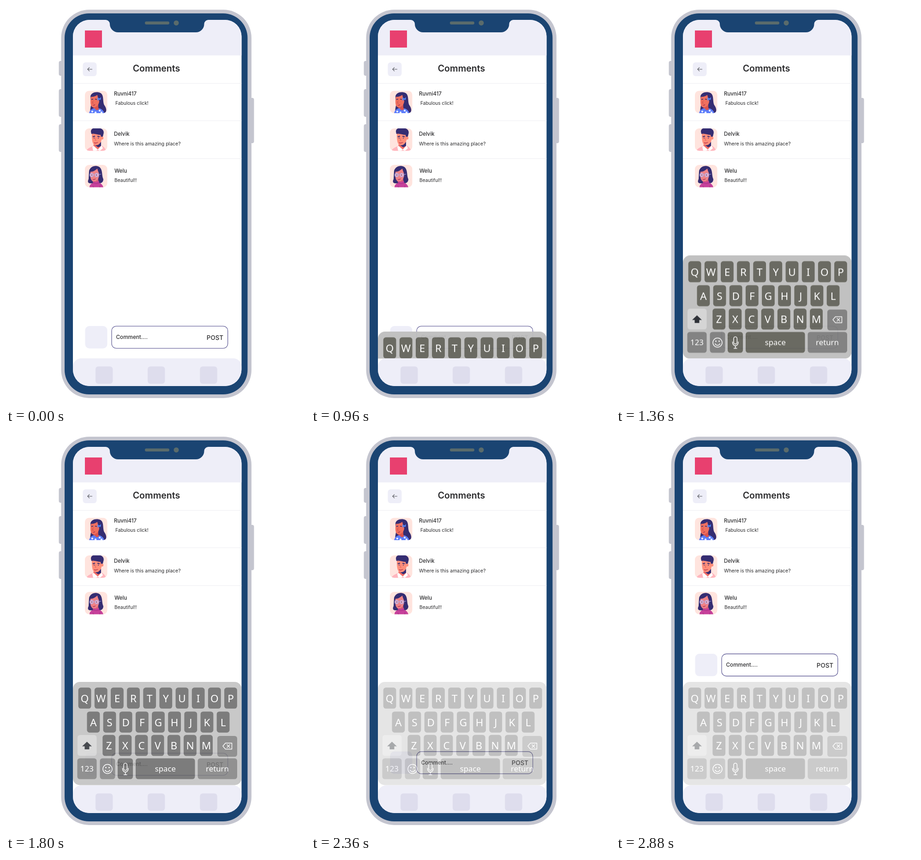
Recreate the animation shown at these times as an HTML page with a canvas. Size 648 by 864 pixels, loop 4.96 s.

```html
<!DOCTYPE html>
<html lang="en">
<head>
<meta charset="utf-8">
<title>Comments</title>
<style>
  html, body { margin: 0; width: 100%; height: 100%; overflow: hidden; background: #fff; }
  canvas { display: block; width: 100vw; height: 100vh; }
</style>
</head>
<body>
<canvas id="stage" width="648" height="864"></canvas>
<script>
const LOOP = 4960, STEP = 40;
const UI = 'Inter, sans-serif', KEYS = '"Noto Sans", "Open Sans", sans-serif';
const PALE = '#eeeef8', INK = '#2b2b2d', NAVY = '#352d72', BLUE = '#1a4472';

const stage = document.getElementById('stage');
const screenCtx = stage.getContext('2d');
const board = document.createElement('canvas');
board.width = 366;
board.height = 224;
const boardCtx = board.getContext('2d');
let c = screenCtx;

function box(x, y, w, h, r, fill, stroke, lw = 1) {
  c.beginPath();
  c.roundRect(x, y, w, h, r);
  if (fill) { c.fillStyle = fill; c.fill(); }
  if (stroke) { c.strokeStyle = stroke; c.lineWidth = lw; c.stroke(); }
}

function disc(x, y, r, fill) {
  c.beginPath();
  c.arc(x, y, r, 0, Math.PI * 2);
  c.fillStyle = fill;
  c.fill();
}

function shape(d, fill) {
  c.fillStyle = fill;
  c.fill(new Path2D(d));
}

function line(d, color, lw = 1) {
  c.strokeStyle = color;
  c.lineWidth = lw;
  c.stroke(new Path2D(d));
}

function text(s, x, y, size, weight = 400, align = 'left', color = INK, family = UI) {
  c.font = `${weight} ${size}px ${family}`;
  c.textAlign = align;
  c.fillStyle = color;
  c.fillText(s, x, y);
}

const clamp = v => Math.min(1, Math.max(0, v));
const progress = (t, start, length) => clamp((t - start) / length);

// cubic-bezier(.42, 0, .58, 1), solved by bisection
function ease(x) {
  if (x <= 0 || x >= 1) return x;
  let lo = 0, hi = 1;
  for (let i = 0; i < 24; i++) {
    const s = (lo + hi) / 2, q = 1 - s;
    if (3 * q * q * s * .42 + 3 * q * s * s * .58 + s * s * s < x) lo = s; else hi = s;
  }
  return lo * lo * (3 - 2 * lo);
}

function drawShell() {
  const grey = '#c4c5cf';
  box(114.5, 119, 10, 32, 4, grey);
  box(114.5, 180, 10, 60, 4, grey);
  box(114.5, 256, 10, 60, 4, grey);
  box(527, 199, 10.5, 98, 4, grey);
  box(119.5, 8, 412.5, 841, 61, grey);
  box(127, 16, 396.5, 825, 53, BLUE);
}

function drawNotch() {
  shape('M216 29 V30 A9 9 0 0 1 225 39 A18 18 0 0 0 243 57 H411.5 A18 18 0 0 0 429.5 39 A9 9 0 0 1 438.5 30 V29Z', BLUE);
  box(301, 33.5, 53, 6.5, 3.25, '#5a6b6b');
  disc(369, 36.7, 5.5, '#5a6b6b');
}

function avatar(y, paint) {
  c.save();
  c.translate(171, y);
  c.beginPath();
  c.roundRect(0, 0, 48.5, 48.5, 9);
  c.clip();
  c.fillStyle = '#ffe4de';
  c.fillRect(0, 0, 49, 49);
  paint();
  c.restore();
}

function longHair() {
  shape('M12 12 C14 3 26 1 34 5 C42 10 38 23 42 31 C47 38 48 44 43 49 H15 C8 43 14 36 13 28Z', NAVY);
  shape('M20 26 H29 V37 C33 39 31 43 25 43 L18 40Z', '#d9544f');
  shape('M13 13 C20 14 25 10 27 9 C28 15 30 18 31 22 C31 30 25 36 18 36 C12 35 12 27 12 22Z', '#f0705f');
  shape('M9 49 C10 42 16 38 21 38 C25 44 29 43 31 38 C38 40 41 44 42 49Z', '#5b7cfb');
  for (const [x, y] of [[16, 45], [23, 47], [32, 43], [36, 47]]) disc(x, y, 2, '#fff');
  shape('M27 14 L31 17 L35 14 L34 20 L30 19 L28 23Z', '#4f86fb');
  line('M14 19 L18 18 M22 18 L26 19', NAVY, 1.3);
  line('M18 21 L16 27 H19', '#c84c4a', 1);
  line('M17 31 Q20 32 22 30', '#a92e4a', 1.2);
}

function shortHair() {
  shape('M20 28 H35 V39 L28 46 L18 40Z', '#f06e68');
  shape('M15 11 C22 7 32 8 37 13 C37 27 34 37 24 37 C16 36 15 27 15 11Z', '#ff8f7b');
  shape('M13 7 C13 1 18 -2 27 0 C37 -2 43 5 40 13 L38 22 L35 21 L34 14 C27 14 20 10 14 12Z', NAVY);
  disc(37, 21, 3.2, '#ff8f7b');
  shape('M20 35 Q28 40 35 29 V38 L29 41 Z', NAVY);
  shape('M3 49 C6 42 14 40 19 38 L28 46 L36 37 C41 40 45 44 46 49Z', '#ffb5bd');
  shape('M19 38 L28 46 L24 49 H18 L16 40Z M36 37 L28 46 L32 49 L39 43Z', '#fff');
  line('M17 18 L22 17 M27 17 L32 18', NAVY, 1.8);
  disc(20, 21, 1, NAVY);
  disc(29, 21, 1, NAVY);
  line('M24 20 L22 26 H25', '#e0645d', 1);
  line('M20 31 Q24 33 28 30', '#b8344c', 1.4);
}

function bobHair() {
  shape('M9 13 C12 2 26 -1 33 6 C39 13 36 23 40 31 C40 37 36 40 31 40 H13 C7 40 5 37 8 31Z', NAVY);
  shape('M19 27 H29 V38 H17Z', '#d95f74');
  shape('M12 15 C20 15 24 10 27 8 C28 14 31 17 31 22 C30 32 24 36 18 36 C12 34 11 25 12 15Z', '#f08386');
  shape('M10 49 C10 43 14 40 18 39 L19 35 C22 38 27 37 30 34 L31 39 C37 41 39 45 40 49Z', '#c6409a');
  line('M18 39 Q24 42 31 39 M17 45 L19 49 M33 44 L32 49', '#a22c83', 1);
  box(10.5, 18, 8, 8, 3.5, 'rgba(220,215,255,.55)', '#a7a4e8');
  box(21.5, 18, 8.5, 8, 3.5, 'rgba(220,215,255,.55)', '#a7a4e8');
  line('M18.5 21 H21.5 M30 21 L35 20', '#a7a4e8');
  disc(15, 22, 1, NAVY);
  disc(25, 22, 1, NAVY);
  line('M17 31 Q20 33 23 30', '#a92e5a', 1.3);
}

function drawPage() {
  c.fillStyle = '#fff';
  c.fillRect(145, 30, 366, 793);
  c.fillStyle = PALE;
  c.fillRect(145, 30, 366, 77);
  box(171, 53, 37, 37, 0, '#e8406f');

  box(166.5, 122, 30, 30, 6, PALE);
  line('M187 137 H177 M181 132.8 L176.8 137 L181 141.2', '#55565c', 1.1);
  text('Comments', 326, 142, 19.6, 600, 'center');
  for (const y of [167, 248, 330]) {
    c.fillStyle = '#eeeef2';
    c.fillRect(145, y, 366, 1);
  }

  avatar(183.5, longHair);
  avatar(265, shortHair);
  avatar(344, bobHair);
  text('Ruvni417', 234, 193.6, 11.4, 500);
  text('Fabulous click!', 237, 214, 10.2);
  text('Delvik', 234, 281.2, 11.4, 500);
  text('Where is this amazing place?', 234, 301.5, 10.5);
  text('Welu', 235, 360.5, 11.4, 500);
  text('Beautiful!!', 235, 381, 10.2);
}

function drawInput(y, touched) {
  box(171.5, y, 48, 48.5, 9, PALE);
  box(229, y + .3, 251.7, 48, 10, '#fff', '#4b4688', 1.1);
  if (touched) {
    disc(267.7, y + 24, 12, 'rgba(255,255,0,.18)');
    disc(267.7, y + 24, 10.3, '#ff0');
  }
  text('Comment....', 238.5, y + 28, 11.7, 500);
  text('POST', 471, y + 29.7, 13.4, 500, 'right');
}

// Key positions are local to the panel's top left corner (145, 539).
function drawBoard(dark) {
  const mid = '#7d7d7d', white = '#fff';
  c = boardCtx;
  c.clearRect(0, 0, 366, 224);
  c.lineCap = c.lineJoin = 'round';
  box(0, 0, 365.5, 223.5, 15, '#bebebe');

  const rows = [['QWERTYUIOP', 25.6, 12.3], ['ASDFGHJKL', 44.4, 64.2], ['ZXCVBNM', 78.2, 114.8]];
  for (const [letters, x0, y] of rows) {
    [...letters].forEach((ch, i) => {
      const x = x0 + i * 35.15;
      box(x - 13.9, y, 27.8, 45.5, 5.5, dark);
      text(ch, x, y + 31.5, 22.5, 400, 'center', white, KEYS);
    });
  }

  box(10, 115, 41.5, 45, 5.5, '#d3d3d3');
  shape('M30.5 129.5 L41 139.5 H35.5 V146 H25.5 V139.5 H20Z', '#24282e');
  box(313, 117, 43, 45, 5.5, mid);
  line('M330.5 132.5 H344.5 V145.5 H330.5 L325 139Z M334 136 L340 142 M340 136 L334 142', white, 1.4);

  box(9.5, 165.5, 42, 45, 5.5, mid);
  text('123', 30.5, 193.7, 16.8, 400, 'center', white, KEYS);
  box(58.5, 165.5, 33, 45, 5.5, mid);
  line('M85 188.5 a10 10 0 1 1 -20 0 a10 10 0 1 1 20 0 M69.5 191 Q75 198 80.5 191', white, 1.5);
  disc(71.5, 185.5, 1.4, white);
  disc(78.5, 185.5, 1.4, white);
  box(97, 165.5, 33, 45, 5.5, dark);
  box(110, 176, 7.4, 15.5, 3.7, null, white, 1.5);
  line('M107.5 187 C107.5 198 120 198 120 187 M113.7 195.5 V201 M110.5 201 H117', white, 1.5);
  box(136, 165.5, 128.5, 45, 5.5, dark);
  text('space', 200.3, 193.7, 16.8, 400, 'center', white, KEYS);
  box(270.5, 165.5, 85.5, 45, 5.5, mid);
  text('return', 313, 193.7, 16.8, 400, 'center', white, KEYS);
  c = screenCtx;
}

function drawKeyboard(t) {
  const rise = ease(progress(t, 720, 678));
  if (rise <= 0) return;
  const fade = progress(t, 1760, 200);
  drawBoard(fade > 0 ? '#636363' : '#63635a');
  c.save();
  c.beginPath();
  c.rect(145, 500, 366, 263.5);
  c.clip();
  c.globalAlpha = .95 - .55 * fade;
  c.drawImage(board, 145, 764 - 225 * rise);
  c.restore();
}

function drawNav() {
  box(145, 763, 365.5, 62, [18, 18, 0, 0], PALE);
  for (const x of [194, 307, 420.3]) box(x, 780.5, 37.4, 37.5, 6, '#dedded');
}

function draw(t) {
  c.fillStyle = '#fff';
  c.fillRect(0, 0, 648, 864);
  drawShell();
  c.save();
  c.beginPath();
  c.roundRect(145, 30, 365.5, 793, 36);
  c.clip();
  drawPage();
  drawInput(693 - 215 * ease(progress(t, 2308, 580)), t >= 520 && t < 680);
  drawKeyboard(t);
  drawNav();
  c.restore();
  drawNotch();
}

function tick() {
  const t = performance.now() % LOOP;
  draw(Math.floor(t / STEP) * STEP);
  requestAnimationFrame(tick);
}
tick();
</script>
</body>
</html>
```
